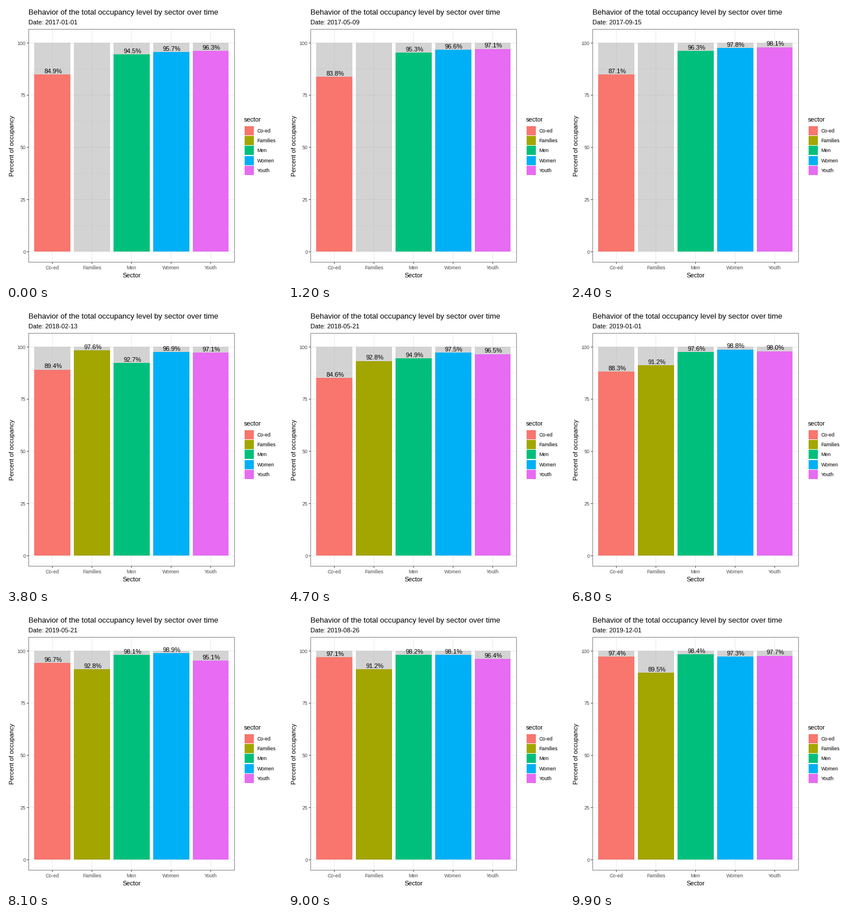
A matplotlib script that plays this animation: 480x480 px, repeating every 10 s.

```python
import numpy as np
import matplotlib.pyplot as plt
from matplotlib.animation import FuncAnimation
from matplotlib.patches import Rectangle

plt.rcParams["font.family"] = "Liberation Sans"

SIZE, DPI = 480, 72  # at 72 dpi one point is one pixel
FRAMES, INTERVAL = 100, 100
LEFT, TOP, BOTTOM = 39.28, 40.5, 445.5
STEP = 68.85
RIGHT = LEFT + 5.2 * STEP
Y0, UNIT = 427.4, 3.631

COLORS = {"Co-ed": "#F8766D", "Families": "#A3A500", "Men": "#00BF7D",
          "Women": "#00B0F6", "Youth": "#E76BF3"}

# Occupancy at a few months counted from January 2017, linear in between
ANCHORS = [0, 9, 14, 20, 24, 29, 35]
LEVELS = {
    "Co-ed": [84.9, 87.1, 89.4, 89.5, 88.3, 96.7, 97.4],
    "Families": [99.2, 99.2, 97.6, 88.0, 91.2, 92.8, 89.5],
    "Men": [94.5, 96.3, 92.7, 97.1, 97.6, 98.1, 98.4],
    "Women": [95.7, 97.8, 96.9, 98.0, 98.8, 98.9, 97.3],
    "Youth": [96.3, 98.1, 97.1, 96.0, 98.0, 95.1, 97.7],
}
# Turning points just before a sharp move
TURNS = {
    "Co-ed": {8: 82.7, 17: 84.6, 28: 89.5},
    "Families": {13: 99.2, 28: 88.2},
    "Men": {13: 92.1},
    "Women": {13: 98.3},
}

MONTHS = np.arange("2017-01", "2020-01", dtype="datetime64[M]").astype("datetime64[D]")
DAYS = (MONTHS - MONTHS[0]).astype(int)
SPAN = int(DAYS[-1])
KEYS = np.rint(DAYS * (FRAMES - 1) / SPAN).astype(int)


def monthly(name):
    points = dict(zip(ANCHORS, LEVELS[name])) | TURNS.get(name, {})
    xs = sorted(points)
    return np.interp(np.arange(len(MONTHS)), xs, [points[x] for x in xs])


data = np.array([monthly(name) for name in COLORS])
data[1, :12] = np.nan  # Families not reported yet
data[1, 27] = np.nan

fig = plt.figure(figsize=(SIZE / DPI, SIZE / DPI), dpi=DPI, facecolor="white")
ax = fig.add_axes([0, 0, 1, 1])
ax.set(xlim=(0, SIZE), ylim=(SIZE, 0))
ax.axis("off")


def text(x, y, s, size=11, color="black", va="baseline", **kw):
    return ax.text(x, y, s, fontsize=size, color=color, va=va, **kw)


def line(xs, ys, color="#EBEBEB", width=1.07, z=1):
    ax.plot(xs, ys, color=color, lw=width, zorder=z, snap=False,
            solid_capstyle="butt")


def box(x, y, w, h, color, z, **kw):
    return ax.add_patch(Rectangle((x, y), w, h, fc=color, lw=0, zorder=z, **kw))


def y_of(value):
    return Y0 - value * UNIT


# Grid and axes
for v in np.arange(0, 101, 12.5):
    y, major = y_of(v), v % 25 == 0
    line([LEFT, RIGHT], [y, y], width=1.07 if major else 0.53)
    if major:
        line([LEFT - 2.75, LEFT], [y, y], "#333333", z=6)
        text(34.4, y + 3.4, f"{v:.0f}", 8.8, "#4D4D4D", ha="right")

# Bars with their grey backgrounds, and the legend
bars, labels = [], []
for i, (name, color) in enumerate(COLORS.items()):
    x = LEFT + (i + 0.6) * STEP
    line([x, x], [TOP, BOTTOM])
    line([x, x], [BOTTOM, BOTTOM + 2.75], "#333333", z=6)
    text(x, 458, name, 8.8, "#4D4D4D", ha="center")

    # Edges widen outward to whole pixels
    x0 = np.floor(x - 0.45 * STEP)
    width = np.ceil(x + 0.45 * STEP) - x0
    box(x0, y_of(100), width, 100 * UNIT, "#A9A9A9", 2, alpha=0.5)
    bars.append(box(x0, Y0, width, 0, color, 3))
    labels.append(text(x + 1.4, Y0, "", ha="center", zorder=5))

    y = 208.1 + 17.28 * i
    box(414.9, y + 0.7, 15.9, 15.9, color, 3)
    text(436.7, y + 11.8, name, 8.8)

x0, y0 = int(LEFT), int(TOP)
ax.add_patch(Rectangle((x0, y0), int(RIGHT) - x0, int(BOTTOM) - y0, fill=False,
                       ec="#858585", lw=1, zorder=6))

text(39, 15, "Behavior of the total occupancy level by sector over time", 13.2)
date = text(39, 32, "")
text(218, 472, "Sector", ha="center")
text(16, 243.5, "Percent of occupancy", va="center", ha="right", rotation=90)
text(413.8, 201, "sector")


def state(frame):
    """Bar heights and label values; labels flip halfway between months."""
    k = int(np.searchsorted(KEYS, frame, side="right")) - 1
    a = data[:, k]
    if KEYS[k] == frame:
        return a, a
    b = data[:, k + 1]
    t = (frame - KEYS[k]) / (KEYS[k + 1] - KEYS[k])
    return a + (b - a) * t, (a if t < 0.5 else b)


def update(frame):
    day = frame * SPAN // (FRAMES - 1)
    date.set_text(f"Date: {MONTHS[0] + np.timedelta64(day, 'D')}")
    for bar, label, h, shown in zip(bars, labels, *state(frame)):
        visible = bool(np.isfinite(h))
        bar.set_visible(visible)
        label.set_visible(visible)
        if visible:
            bar.set_y(y_of(h))
            bar.set_height(h * UNIT)
            label.set_y(y_of(h) - 2.2)
            label.set_text(f"{shown:.1f}%")
    return [date, *bars, *labels]


anim = FuncAnimation(fig, update, frames=FRAMES, interval=INTERVAL,
                     repeat=True, repeat_delay=0, blit=False)
plt.show()
```
